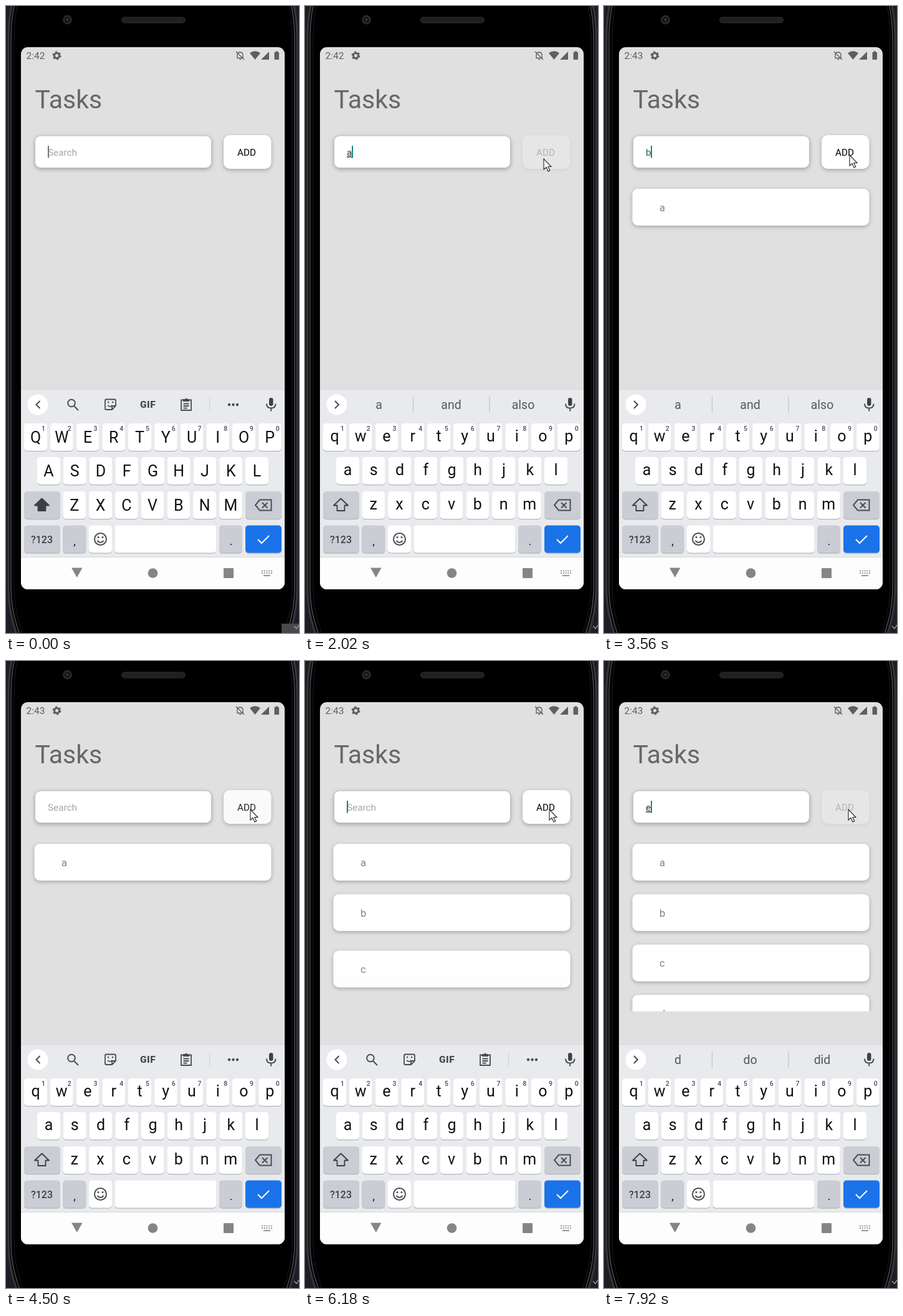
Write an HTML page that moves like this. It is 470 by 1005 pixels and loops after 8 s.

```html
<!DOCTYPE html>
<html lang="en">
<head>
<meta charset="utf-8">
<title>Tasks</title>
<style>
  html, body { margin: 0; width: 100%; height: 100%; overflow: hidden; background: #1d1e25; }
  svg { display: block; }
  text { font-family: Roboto, sans-serif; white-space: pre; }
  .card { fill: #fff; filter: drop-shadow(0 2px 3px rgba(0, 0, 0, .27)); }
  .mid { text-anchor: middle; }
  .key { fill: #fff; }
  .grey { fill: #cbcdd5; }
  .letter { font-size: 25px; fill: #111; }
  .hint { font-size: 10.5px; fill: #4b4d51; font-weight: 500; }
  .word { font-size: 19.5px; fill: #55585c; }
  .line { fill: none; stroke: #4a4c50; stroke-width: 2; }
</style>
</head>
<body>
<svg width="470" height="1005" viewBox="0 0 470 1005">
  <defs>
    <clipPath id="screen"><rect x="24" y="66" width="423" height="869" rx="11"/></clipPath>
    <clipPath id="listArea"><rect x="24" y="270" width="423" height="291.5"/></clipPath>
  </defs>

  <!-- phone body -->
  <rect width="470" height="1005" fill="#1d1e25"/>
  <path d="M14-20C6 10 4 25 4 60V930C4 960 8 985 22 1020H450C463 985 467 960 467 930V60C467 25 465 10 457-20Z" fill="#08080a" stroke="#36373c" stroke-width="3"/>
  <path d="M18-20C10 10 8 28 8 60V930C8 958 12 982 27 1020H445C459 982 463 958 463 930V60C463 28 461 10 453-20Z" fill="#000" stroke="#5b5c61" stroke-width="1.2"/>
  <path d="M22-20C15 10 13 30 13 60V930C13 955 17 980 32 1020H440C455 980 459 955 459 930V60C459 30 457 10 450-20Z" fill="#000" stroke="#1c1c1f"/>
  <circle cx="98.500" cy="22" r="7.500" fill="#26272a"/>
  <circle cx="98.500" cy="22" r="4" fill="#101114"/>
  <circle cx="98.500" cy="22" r="1.800" fill="#44464b"/>
  <rect x="185.500" y="18" width="102" height="9" rx="4.500" fill="#202022" stroke="#2e2e30"/>
  <rect id="corner" x="442" y="990" width="28" height="15" fill="#48494d"/>
  <path d="M462 994l4 4 4-6" fill="none" stroke="#a5a6a9" stroke-width="1.300"/>

  <g clip-path="url(#screen)">
    <rect x="24" y="66" width="423" height="869" fill="#e0e0e0"/>

    <!-- status bar -->
    <g fill="#5f5f5f">
      <text id="clock" x="32.500" y="85" font-size="15.500"></text>
      <circle cx="81.500" cy="79.500" r="4" fill="none" stroke="#5f5f5f" stroke-width="3"/>
      <circle cx="81.500" cy="79.500" r="6" fill="none" stroke="#5f5f5f" stroke-width="2" stroke-dasharray="3.140 3.140"/>
      <path d="M371 83.500h9v-5q0-4-4.500-4.500-4.500.5-4.500 4.500zM369 73l13 13M374.500 85.500h2.500" fill="none" stroke="#5f5f5f" stroke-width="1.400"/>
      <path d="M391 75.500Q399.500 69 408 75.500L399.500 86ZM409 86L422 73V86ZM430.500 74h2v-1.500h3.500V74h2v12h-7.500z"/>
    </g>

    <text x="46.500" y="164" font-size="41" fill="#676767">Tasks</text>

    <!-- input and button -->
    <rect class="card" x="46.500" y="208" width="283" height="51.500" rx="9" stroke="#bdbdbd"/>
    <text id="entry" x="67" y="240" font-size="15.300"></text>
    <rect id="caret" y="224" width="1.800" height="19.500"/>
    <g id="button">
      <rect class="card" x="349" y="207" width="76.500" height="54" rx="10"/>
      <text class="mid" x="386" y="240" font-size="15.200" fill="#000">ADD</text>
    </g>

    <g id="list" clip-path="url(#listArea)"></g>

    <!-- keyboard -->
    <rect x="24" y="614" width="423" height="271" fill="#e8eaed"/>
    <rect x="24" y="614" width="423" height="1" fill="#d6d8db"/>
    <circle cx="51" cy="639" r="16.500" fill="#fff"/>
    <path id="chevron" class="line"/>

    <g id="tools">
      <g class="line">
        <circle cx="105" cy="636.500" r="5.800"/>
        <path d="M109 641l7 7"/>
        <path d="M161 630.500h13q2 0 2 2v8.500l-6 6h-9q-2 0-2-2v-12.500q0-2 2-2zM175.500 641h-5.500v5.500" stroke-width="1.800"/>
        <path d="M163 640q4 4 7 0" stroke-width="1.600"/>
        <path d="M281 631.500h16v16.500h-16zM284.500 637.500h9M284.500 641h9M284.500 644.500h6" stroke-width="1.800"/>
      </g>
      <path d="M163 634h2.200v2.200H163zM170 634h2.200v2.200H170zM284 630h3q2-3 4 0h3v4h-10z" fill="#4a4c50"/>
      <text class="mid" x="227.500" y="644" font-size="15.500" font-weight="900" fill="#4a4c50" letter-spacing=".5">GIF</text>
      <path d="M326.500 627v24" stroke="#cfd1d4"/>
      <g fill="#4a4c50"><circle cx="358" cy="639" r="2.200"/><circle cx="364.500" cy="639" r="2.200"/><circle cx="371" cy="639" r="2.200"/></g>
    </g>
    <g id="words">
      <text class="word mid" x="118.500" y="646"></text>
      <text class="word mid" x="234.500" y="646"></text>
      <text class="word mid" x="350" y="646"></text>
      <path d="M173.500 626v26M296 626v26" stroke="#c3c5c8" stroke-width="1.300"/>
    </g>
    <rect x="422" y="628" width="6.500" height="13" rx="3.250" fill="#3f4145"/>
    <path class="line" d="M418 637.500q0 7 7.200 7 7.300 0 7.300-7M425.200 644.500v5"/>

    <g id="keys"></g>
    <path id="shift" d="M57.500 789.500L69 800.500h-5.500v8.500h-12v-8.500H46Z" stroke="#3c3e42" stroke-width="1.800" stroke-linejoin="round"/>
    <path class="line" d="M407 791.500h18.500v17H407l-7-8.500zM411 796l8.500 8.500M419.500 796L411 804.500"/>
    <g class="line"><circle cx="151.500" cy="854.500" r="9.500"/><path d="M146.500 857q5 6 10 0"/></g>
    <g fill="#4a4c50"><circle cx="148" cy="851.500" r="1.500"/><circle cx="155" cy="851.500" r="1.500"/></g>
    <path d="M404 855l6 6 12-12" fill="none" stroke="#fff" stroke-width="2"/>
    <text class="mid" x="57.500" y="861" font-size="16" font-weight="500" fill="#3f4145">?123</text>
    <text class="mid" x="110" y="864" font-size="19" fill="#222">,</text>
    <text class="mid" x="361" y="864" font-size="19" fill="#222">.</text>

    <!-- navigation bar -->
    <rect x="24" y="884" width="423" height="51" fill="#fdfdfd"/>
    <rect x="24" y="883" width="423" height="1" fill="#d9dbde"/>
    <g fill="#858585">
      <path d="M105 900.500h17.500l-8.700 15.500z"/>
      <circle cx="235.500" cy="909" r="7.800"/>
      <rect x="349" y="901" width="16" height="16" rx="1"/>
    </g>
    <path d="M410 905.500h17M410 909h17" stroke="#969696" stroke-width="2" stroke-dasharray="2 1.750"/>
    <path d="M413 913h11" stroke="#969696" stroke-width="2"/>
  </g>

  <path id="mouse" d="M0 0V17L4 13.500 7 20 9.800 18.800 6.800 12.500H12Z" fill="#fff" stroke="#222" stroke-width="1.100"/>
</svg>

<script>
const LOOP = 8000, TEAL = '#00796b';
const $ = id => document.getElementById(id);
const clamp = v => Math.max(0, Math.min(1, v));

function add(parent, tag, attrs, text = '') {
  const el = document.createElementNS('http://www.w3.org/2000/svg', tag);
  for (const name in attrs) el.setAttribute(name, attrs[name]);
  el.textContent = text;
  parent.append(el);
  return el;
}

// Timelines: [start, value]
const entries = [[0, ''], [1260, 'a'], [2930, ''], [3560, 'b'], [4400, ''], [4980, 'c'],
  [5810, ''], [6570, 'd'], [6980, ''], [7780, 'e']];
const suggestions = [[0, ''], [1400, 'a and also'], [3840, 'b be but'], [4450, ''],
  [5240, 'c can could'], [6000, ''], [6980, 'd do did']];
const capitals = [[0, true], [1260, false], [6310, true], [6570, false]];
const caretOn = [[0, 1], [300, 0], [800, 1], [2300, 0], [2760, 1], [3060, 0], [3560, 1], [4060, 0],
  [4560, 1], [5380, 0], [5800, 1], [6370, 0], [6570, 1], [6900, 0], [7200, 1], [7450, 0], [7780, 1]];
// Button presses: [down, up]
const presses = [[1870, 2830], [3840, 4300], [5240, 5710], [6570, 6840], [7770, 9000]];
// Pointer stops: [time, x, y]
const route = [[0, 472, 1008], [140, 470, 1000], [860, 138, 227], [930, 138, 227], [1000, 127, 224],
  [1200, 127, 224], [1750, 383, 245], [2950, 383, 245], [3250, 394, 239], [4050, 394, 239], [4300, 392, 238], [LOOP, 392, 238]];

const latest = (list, t) => list.findLast(step => step[0] <= t);

function addKey(x, y, width, kind = 'key') {
  add($('keys'), 'rect', { x, y: y + 1.2, width, height: 44, rx: 5, fill: '#b4b6ba' });
  return add($('keys'), 'rect', { x, y, width, height: 44, rx: 5, class: kind });
}

const letters = [];
const PITCH = 41.75;
[['qwertyuiop', 29, 669], ['asdfghjkl', 50, 723], ['zxcvbnm', 91.3, 778]].forEach(([row, left, y], r) => {
  [...row].forEach((char, i) => {
    const x = left + i * PITCH;
    addKey(x, y, 37);
    const el = add($('keys'), 'text', { x: x + 18.5, class: 'letter mid' });
    letters.push({ el, char, y: y + 31 });
    if (r === 0) add($('keys'), 'text', { x: x + 31, y: 681, class: 'hint mid' }, (i + 1) % 10);
  });
});
addKey(29, 778, 58, 'grey');
addKey(384, 778, 58, 'grey');
addKey(29, 832.5, 58, 'grey');
addKey(91.3, 832.5, 37, 'grey');
addKey(133, 832.5, 37);
addKey(174.5, 832.5, 163);
addKey(342, 832.5, 37, 'grey');
addKey(384, 832.5, 58).style.fill = '#1a73e8';

const items = [['a', 3230], ['b', 4700], ['c', 6110], ['d', 7380]].map(([name, start], i) => {
  const group = add($('list'), 'g', {});
  const top = 293 + i * 80.7;
  add(group, 'rect', { class: 'card', x: 45.5, y: top, width: 380, height: 59, rx: 9 });
  const label = add(group, 'text', { x: 89, y: top + 36, 'font-size': 16.5, fill: '#808080' }, name);
  return { group, label, start };
});

function setCase(upper) {
  for (const { el, char, y } of letters) {
    el.textContent = upper ? char.toUpperCase() : char;
    el.setAttribute('y', upper ? y : y - 1.8);
  }
  $('shift').setAttribute('fill', upper ? '#3c3e42' : 'none');
}

function drawEntry(t) {
  const [since, text] = latest(entries, t);
  const fresh = 'bc'.includes(text) && text && t - since < 140;
  const entry = $('entry');
  entry.textContent = text || 'Search';
  entry.setAttribute('fill', !text ? '#a6a6a6' : !fresh ? '#333' : text === 'b' ? '#356b64' : '#2f9488');
  entry.setAttribute('text-decoration', text && !fresh ? 'underline' : 'none');
  $('caret').setAttribute('x', text ? 75.2 : 67);
  $('caret').setAttribute('fill', t < 1200 ? '#6b6b6b' : TEAL);
  $('caret').setAttribute('opacity', latest(caretOn, t)[1]);
}

function drawBar(t) {
  const words = latest(suggestions, t)[1];
  $('tools').style.display = words ? 'none' : '';
  $('words').style.display = words ? '' : 'none';
  $('chevron').setAttribute('d', words ? 'M48 633l6 6-6 6' : 'M54.500 633l-6 6 6 6');
  const slots = $('words').querySelectorAll('text');
  words.split(' ').forEach((word, i) => slots[i].textContent = word);
}

function buttonOpacity(t) {
  const press = latest(presses, t);
  if (!press) return 1;
  const [down, up] = press;
  return t < up ? 1 - .8 * clamp((t - down) / 150) : .2 + .8 * clamp((t - up) / 250);
}

function drawItems(t) {
  for (const { group, start } of items) {
    const age = t - start;
    const offset = 22 * (1 - clamp(age / 300)) ** 3;
    group.style.display = age < 0 ? 'none' : '';
    group.setAttribute('transform', `translate(0 ${offset})`);
    group.setAttribute('opacity', clamp(.35 + age / 120));
  }
  items[1].label.setAttribute('fill', t < 5240 ? '#629a8e' : '#808080');
}

function drawMouse(t) {
  const next = route.findIndex(stop => stop[0] > t);
  const [t0, x0, y0] = route[next - 1], [t1, x1, y1] = route[next];
  const p = (t - t0) / (t1 - t0), ease = p * p * (3 - 2 * p);
  $('mouse').setAttribute('transform', `translate(${x0 + (x1 - x0) * ease} ${y0 + (y1 - y0) * ease})`);
}

function draw(now) {
  const t = Math.max(0, now) % LOOP;
  $('clock').textContent = t < 2400 ? '2:42' : '2:43';
  $('corner').style.display = t < 70 ? '' : 'none';
  drawEntry(t);
  drawBar(t);
  setCase(latest(capitals, t)[1]);
  $('button').setAttribute('opacity', buttonOpacity(t));
  drawItems(t);
  drawMouse(t);
}

const begin = performance.now();
function tick(now) {
  draw(now - begin);
  requestAnimationFrame(tick);
}
draw(0);
requestAnimationFrame(tick);
</script>
</body>
</html>
```
